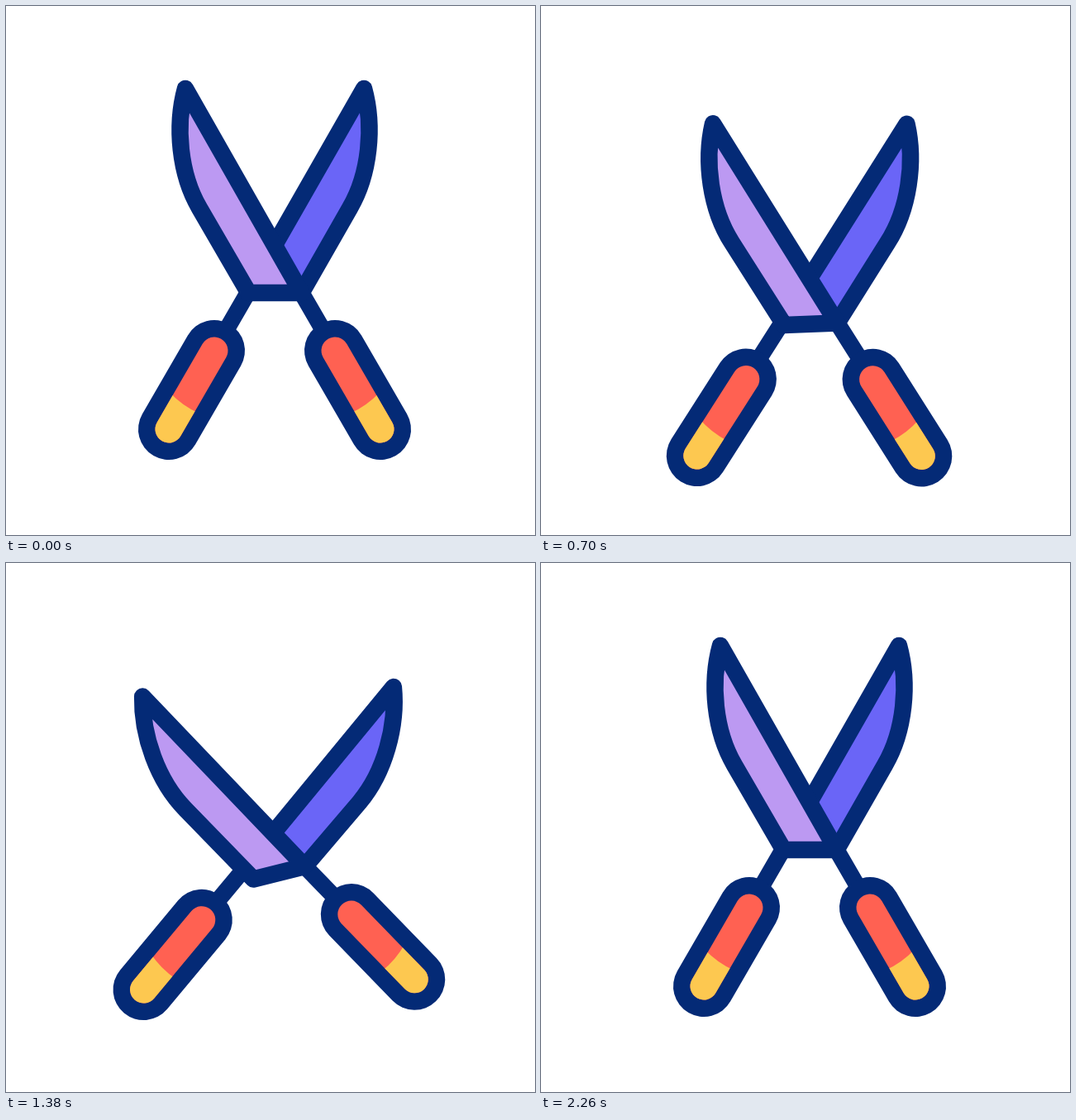
Write an HTML page with a canvas that moves like this. It is 640 px wide and 640 px high and loops after 2.4 s.

```html
<!DOCTYPE html>
<html lang="en">
<head>
<meta charset="utf-8">
<title>Garden shears</title>
<style>
  html, body { margin: 0; width: 100%; height: 100%; overflow: hidden; background: #fff; }
  canvas { display: block; }
</style>
</head>
<body>
<canvas id="stage" width="640" height="640"></canvas>
<script>
const ctx = document.getElementById('stage').getContext('2d');
const LOOP = 2400, STEP = 20;
const NAVY = '#042a76', LILAC = '#bc99f2', VIOLET = '#6a65f7', RED = '#ff6152', YELLOW = '#fdc850';
const CENTER = [325, 326.5];
const BACK_PIVOT = -5.5; // the rear half turns about a point slightly above the center
const CORNER = [32.5, 20.5];

// Keyframes as [ms, value]; angles in degrees, eased in and out.
const FRONT = [[0, 0], [520, -15], [922, 15.1], [1415, -14.5], [1770, 9.9], [2230, 0]];
const BACK = [[0, 0], [520, 15.2], [922, -14.9], [1415, 10.1], [1770, -13.9], [2230, 0]];
const LIFT = [[0, 0], [545, 86], [910, -38.3], [1350, 29.5], [1705, -20], [2080, 0]];

function valueAt(keys, t) {
  const i = keys.findIndex(key => key[0] > t);
  if (i < 0) return keys[keys.length - 1][1];
  const [t0, v0] = keys[i - 1], [t1, v1] = keys[i];
  const u = (t - t0) / (t1 - t0);
  return v0 + (v1 - v0) * u * u * (3 - 2 * u);
}

function line(x0, y0, x1, y1, width, color) {
  ctx.beginPath();
  ctx.moveTo(x0, y0);
  ctx.lineTo(x1, y1);
  ctx.lineWidth = width;
  ctx.strokeStyle = color;
  ctx.stroke();
}

function handle() {
  const grip = [73, 90.5, 128, 185.5];
  line(...CORNER, 73, 90.5, 20, NAVY);
  line(...grip, 74, NAVY);
  line(...grip, 33, RED);
  ctx.save();
  ctx.beginPath();
  ctx.moveTo(92, 166);
  ctx.quadraticCurveTo(112, 157, 127, 141);
  ctx.lineTo(180, 190);
  ctx.lineTo(140, 240);
  ctx.lineTo(80, 210);
  ctx.clip();
  line(...grip, 33, YELLOW);
  ctx.restore();
}

// The curved outer edge is shared; the lower points close the blade.
function blade(color, ...base) {
  ctx.beginPath();
  ctx.moveTo(-108, -226.5);
  ctx.bezierCurveTo(-120.5, -181, -115, -123, -91, -82);
  for (const point of base) ctx.lineTo(...point);
  ctx.closePath();
  ctx.fillStyle = color;
  ctx.fill();
  ctx.lineWidth = 20.5;
  ctx.strokeStyle = NAVY;
  ctx.stroke();
}

function half(matrix, paint) {
  ctx.save();
  ctx.setTransform(matrix);
  paint();
  ctx.restore();
}

function draw(t) {
  const place = new DOMMatrix().translate(CENTER[0], CENTER[1] + valueAt(LIFT, t));
  const front = place.rotate(valueAt(FRONT, t));
  const back = place.translate(0, BACK_PIVOT).rotate(valueAt(BACK, t))
    .translate(0, -BACK_PIVOT).scale(-1, 1);
  // The rear blade stays joined to the front blade's corner.
  const joint = back.inverse().multiply(front).transformPoint(new DOMPoint(...CORNER));
  ctx.fillStyle = '#fff';
  ctx.fillRect(0, 0, 640, 640);
  ctx.lineCap = ctx.lineJoin = 'round';
  half(back, () => {
    handle();
    blade(VIOLET, [joint.x, joint.y], [8, -23.5]);
  });
  half(front, () => {
    handle();
    blade(LILAC, [-31.5, 20.5], CORNER);
  });
}

function tick() {
  const t = performance.now() % LOOP;
  draw(Math.floor(t / STEP) * STEP);
  requestAnimationFrame(tick);
}
tick();
</script>
</body>
</html>
```
